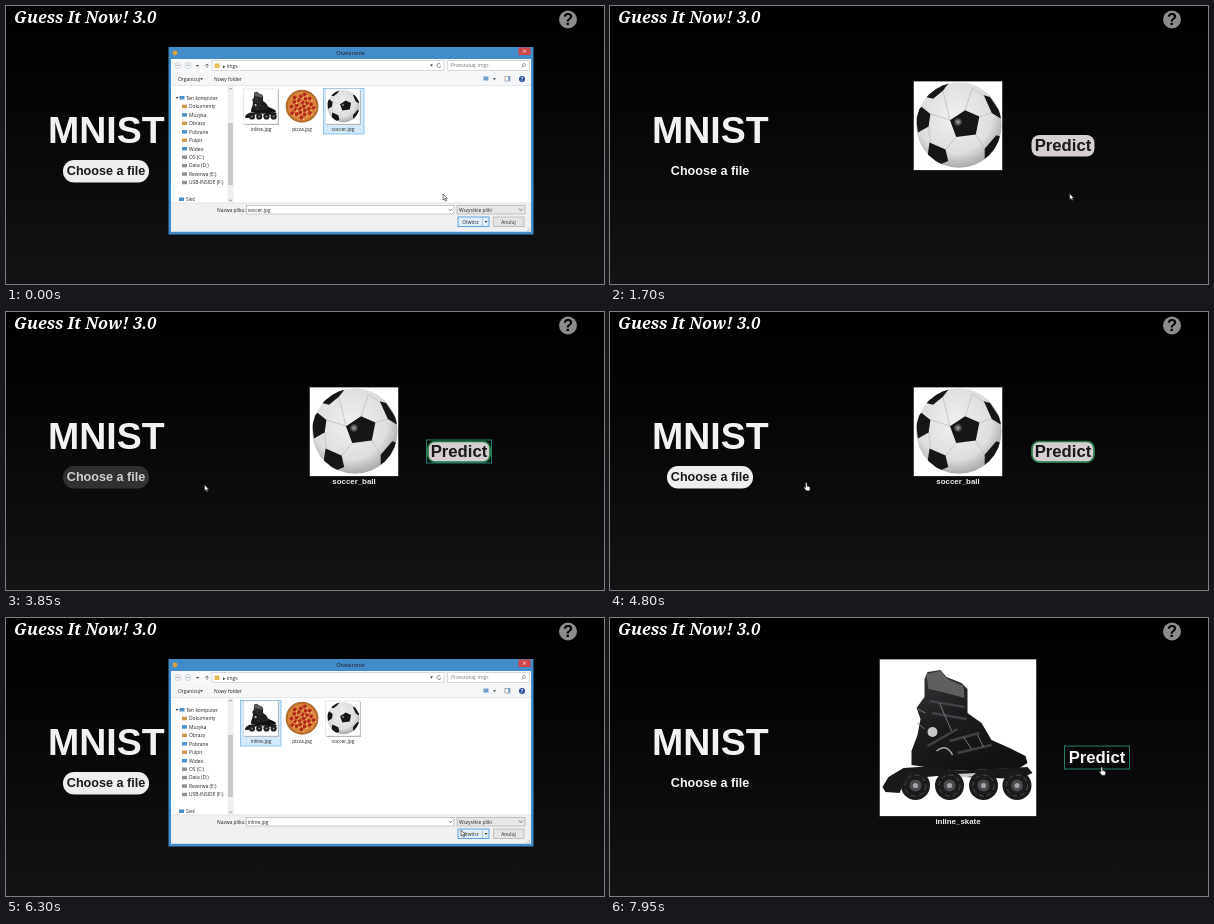
Recreate the animation shown at these times as an HTML page. Size 598 px wide and 278 px high, loop 8000 ms.

```html
<!DOCTYPE html>
<html lang="en">
<head>
<meta charset="utf-8">
<title>Image classifier demo</title>
<style>
  html, body { margin: 0; width: 100%; height: 100%; overflow: hidden; background: #000; }
  svg { position: absolute; left: 0; top: 0; width: 598px; height: 278px; }
  #dialog { transform-origin: 344.5px 134.5px; }
  .bold { font-family: "Liberation Sans", Arial, sans-serif; font-weight: bold; }
  .ui { font-family: "Open Sans", "Noto Sans", sans-serif; font-size: 4.9px; fill: #222; }
  .mid { text-anchor: middle; }
</style>
</head>
<body>
<svg id="page" viewBox="0 0 598 278">
  <defs>
    <linearGradient id="night" x2="0" y2="1">
      <stop stop-color="#000"/><stop offset=".3" stop-color="#040405"/><stop offset="1" stop-color="#131316"/>
    </linearGradient>
    <radialGradient id="leather" cx=".45" cy=".4" r=".62">
      <stop stop-color="#f0f0f0"/><stop offset=".7" stop-color="#dedede"/><stop offset="1" stop-color="#a4a4a4"/>
    </radialGradient>
    <radialGradient id="shine"><stop stop-color="#aaa"/><stop offset="1" stop-color="#1a1a1a"/></radialGradient>
    <linearGradient id="boot" x2=".6" y2="1"><stop stop-color="#3a3a3d"/><stop offset=".5" stop-color="#1c1c1e"/><stop offset="1" stop-color="#111"/></linearGradient>
    <clipPath id="round"><circle cx="51" cy="49.5" r="48"/></clipPath>

    <symbol id="ball" viewBox="0 0 100 100">
      <rect width="100" height="100" fill="#fff"/>
      <circle cx="51" cy="49.5" r="48" fill="url(#leather)"/>
      <g clip-path="url(#round)">
        <path d="M41 44L33 11M41 44L19 37M58 33L66 8M74 40L88 36M70 60L80 76M48 63L36 77M17 51L19 69M66 8L81 18M39 90L62 92L80 88" fill="none" stroke="#bbb" stroke-width=".8"/>
        <path d="M41 44L58 33L74 40L70 60L48 63ZM14 18L23 6L40 2L33 11L22 20ZM2 36L9 29L19 37L17 51L5 58ZM18 69L36 77L39 90L29 94L16 83ZM79 16L86 18L98 36L98 42L88 36ZM80 76L93 61L99 63L92 82L80 90Z" fill="#161616"/>
      </g>
      <circle cx="50" cy="46" r="5" fill="url(#shine)"/>
    </symbol>

    <symbol id="skate" viewBox="0 0 157 157">
      <rect width="157" height="157" fill="#fff"/>
      <path d="M45 20L48 13L61 11L67 18L82 24L88 30L88 54L102 64L112 81L130 89L146 97L148 104L140 109L72 112L32 106L32 92L38 76L41 60L37 49L45 38Z" fill="url(#boot)"/>
      <path d="M47 15L61 12L68 20L84 27L85 39L63 33L49 30Z" fill="#5f5f62"/>
      <path d="M50 42L85 48M52 54L87 60M48 87L78 70M70 82L100 74M78 94L112 86" stroke="#414145" stroke-width="2.5" fill="none"/>
      <path d="M38 50L46 54M38 64L45 70M60 44L72 72M84 78L92 90M98 76L104 88" stroke="#77777b"/>
      <path d="M57 92Q67 84 73 96" stroke="#aaa" stroke-width="1.5" fill="none"/>
      <circle cx="53" cy="73" r="5" fill="#c8c8c8"/>
      <path d="M3 128L9 118L24 109L54 107L72 112L148 108L153 114L140 120L58 117L36 119L24 125L20 134L6 133Z" fill="#19191b"/>
      <path d="M76 115L98 114L96 117L79 119Z" fill="#ccc"/>
      <g id="wheels"></g>
    </symbol>

    <symbol id="pizza" viewBox="0 0 100 100">
      <circle cx="50" cy="50" r="49" fill="#b06a2b"/>
      <circle cx="50" cy="50" r="43" fill="#d9843b"/>
      <g id="toppings"></g>
    </symbol>
  </defs>

  <rect width="598" height="278" fill="url(#night)"/>
  <text x="8" y="17" fill="#fff" font-family="Noto Serif, serif" font-size="16.3" font-weight="bold" font-style="italic">Guess It Now! 3.0</text>
  <circle cx="562" cy="13.5" r="9" fill="#8c8c8c"/>
  <text class="bold mid" x="562" y="19.3" font-size="16.5">?</text>
  <text class="bold mid" x="100.3" y="136.8" font-size="37.5" fill="#f2f2f2">MNIST</text>
  <rect id="chooseBg" x="57" y="154" width="86" height="22.5" rx="11"/>
  <text id="chooseText" class="bold mid" x="100" y="169.3" font-size="12.6">Choose a file</text>

  <g id="result">
    <g id="ballPhoto">
      <use href="#ball" x="303.5" y="75" width="89" height="89"/>
      <rect x="303.5" y="75.5" width="89" height="89" fill="none" stroke="#444" stroke-dasharray="1 1"/>
    </g>
    <g id="skatePhoto">
      <use href="#skate" x="269.5" y="41" width="157" height="157"/>
      <rect x="269.5" y="41.5" width="157" height="157" fill="none" stroke="#444" stroke-dasharray="1 1"/>
    </g>
    <text id="caption" class="bold mid" x="348" font-size="7.9" fill="#eee"></text>
    <g id="predict">
      <rect id="predictBg" x="421.5" y="129" width="63" height="21.5" rx="8"/>
      <text id="predictText" class="bold mid" x="453" y="145" font-size="16.7">Predict</text>
      <rect id="ring" x="422" y="129.5" width="62" height="20.5" rx="7" fill="none" stroke="#1d7a3c" stroke-width="1.6"/>
      <rect id="outline" x="420.5" y="128" width="65" height="23" fill="none" stroke="#20806c"/>
    </g>
  </g>
</svg>

<svg id="dialog" viewBox="0 0 598 278"></svg>

<svg viewBox="0 0 598 278">
  <path id="arrow" d="M0 0V6L1.4 4.8L2.5 7L3.5 6.5L2.5 4.4H4.3Z" fill="#fff" stroke="#222" stroke-width=".6"/>
  <path id="hand" d="M0 0Q1 -.9 1.5 .2V3L4.2 3.8Q5 4.4 4.2 7.8H.8L-1.7 4.4Q-1.3 3.4 0 4.5Z" fill="#fff" stroke="#222" stroke-width=".5"/>
</svg>

<script>
const LOOP = 8000;
const $ = id => document.getElementById(id);
const clamp = v => Math.min(1, Math.max(0, v));
const ramp = (t, start, length) => clamp((t - start) / length);
const within = (t, a, b) => t >= a && t < b;
const show = (el, on) => el.setAttribute("visibility", on ? "visible" : "hidden");

const rect = (x, y, w, h, fill, extra = "") => `<rect x="${x}" y="${y}" width="${w}" height="${h}" fill="${fill}" ${extra}/>`;
const label = (x, y, text, extra = "") => `<text class="ui" x="${x}" y="${y}" ${extra}>${text}</text>`;
const line = (d, stroke, width = .7) => `<path d="${d}" fill="none" stroke="${stroke}" stroke-width="${width}"/>`;
const caret = (x, y) => `<path d="M${x} ${y}h3l-1.5 1.8z" fill="#333"/>`;
const dot = (x, y, r, fill, extra = "") => `<circle cx="${x}" cy="${y}" r="${r}" fill="${fill}" ${extra}/>`;

$("wheels").innerHTML = [36, 70, 104, 137.5].map(x =>
  dot(x, 126.5, 14.5, "#1b1b1c") + dot(x, 126.5, 10.5, "none", 'stroke="#4c4c50" stroke-dasharray="5 3"') +
  dot(x, 126.5, 6, "#4a4a4e") + dot(x, 126.5, 2.6, "#a4a4a8")).join("");

$("toppings").innerHTML = Array.from({ length: 24 }, (_, i) => {
  const r = 37 * Math.sqrt((i + .5) / 24), a = i * 2.4;
  const x = 50 + r * Math.cos(a), y = 50 + r * Math.sin(a);
  return dot(x, y, 5.6, "#b5281c") + dot(x + 6, y + 5, 2.4, "#f0cf82");
}).join("");

function buildDialog() {
  const places = ["Dokumenty", "Muzyka", "Obrazy", "Pobrane", "Pulpit", "Wideo", "OS (C:)", "Data (D:)", "Rezerwa (E:)", "USB-INSIDE (F:)"];
  const files = [["skate", "inline.jpg", 255], ["pizza", "pizza.jpg", 296], ["ball", "soccer.jpg", 337]];
  const box = 'stroke="#c8ccd0" stroke-width=".7"';
  return [
    rect(162.5, 41, 365, 187.5, "#418cc9"),
    rect(165, 53, 360, 172.5, "#fff"),
    rect(512.5, 41.5, 12, 7.5, "#d0474b"), line("M517 43.7l3 3m0 -3l-3 3", "#fff"),
    dot(169, 47, 2.4, "#d9a13a"),
    label(344.5, 49.2, "Otwieranie", 'text-anchor="middle" style="font-size:5.6px"'),
    rect(165, 53, 360, 13, "#f7f8fa"),
    dot(172, 59.5, 3, "none", 'stroke="#c3c6ca" stroke-width=".7"'), dot(182, 59.5, 3, "none", 'stroke="#c3c6ca" stroke-width=".7"'),
    line("M173.5 59.5h-3l1.2 -1.2M180.5 59.5h3l-1.2 -1.2", "#9da2a8"),
    caret(190, 59), line("M201 62v-4l-1.7 1.7M201 58l1.7 1.7", "#555"),
    rect(206, 54.5, 232, 10, "#fff", box), rect(208.5, 57.5, 5, 4.5, "#e6bd55"),
    label(217, 61.5, "▸ imgs"), caret(424, 58.6), line("M434.5 58.2a2 2 0 1 0 .4 1.8", "#666"),
    rect(441.5, 54.5, 82, 10, "#fff", box), label(445, 61.3, "Przeszukaj: imgs", 'style="fill:#777"'),
    dot(518, 59, 1.5, "none", 'stroke="#777" stroke-width=".6"'), line("M517 60l-1.5 1.7", "#777"),
    rect(165, 66, 360, 13.5, "#f5f6f8"), line("M165 79.5h360", "#dfe2e6"),
    label(172, 74.8, "Organizuj"), caret(194, 72.2), label(208, 74.8, "Nowy folder"),
    rect(477.5, 70.5, 5, 4, "#6d9dca"), caret(487, 72.2),
    rect(499, 70.5, 5, 4.5, "#fff", 'stroke="#777" stroke-width=".6"'), rect(502, 70.5, 2, 4.5, "#7aa7d0"),
    dot(516, 73, 3, "#2a4f9e"), label(516, 74.8, "?", 'text-anchor="middle" style="fill:#fff;font-weight:bold"'),
    caret(169.5, 91), rect(173.5, 90, 5, 3.5, "#4d93c7"), label(180, 93.8, "Ten komputer"),
    ...places.map((name, i) => rect(176, 98.7 + i * 8.45, 5, 3.5, i < 6 ? ["#cf9a4c", "#4b91ce"][i % 2] : "#8d9297") +
      label(183, 102.3 + i * 8.45, name)),
    rect(173, 191.5, 5, 3.5, "#4a8cc4"), label(180, 195, "Sieć"),
    rect(221.5, 80, 6, 117, "#efefef"), rect(222, 117, 5, 62, "#c9c9c9"),
    line("M223 83.5l1.5 -1.5l1.5 1.5M223 193.5l1.5 1.5l1.5 -1.5", "#666"),
    `<rect id="selected" y="82.5" width="40.5" height="45.5" fill="#d3eafb" stroke="#79b8e6" stroke-width=".8"/>`,
    ...files.map(([art, name, x]) => (art === "pizza" ? "" :
      rect(x - 16.2, 84, 34, 35, "#aaa") + rect(x - 17.2, 83, 34, 35, "#fff", 'stroke="#d2d2d2" stroke-width=".6"')) +
      `<use href="#${art}" x="${x - 16.7}" y="83.5" width="33.5" height="33.5"/>` +
      label(x, 125.2, name, 'text-anchor="middle"')),
    rect(165, 197, 360, 28.5, "#f0f0f0"), line("M165 197h360", "#dcdcdc"),
    label(211, 205.7, "Nazwa pliku:"),
    `<rect id="field" x="240.5" y="199.5" width="207.5" height="8.5" fill="#fff" stroke-width=".7"/>`,
    `<rect id="marked" x="241.5" y="200.7" width="22.5" height="6" fill="#3399ff"/>`,
    label(241.7, 205.7, "", 'id="fileName"'), line("M442.6 202.7l1.8 1.8l1.8 -1.8", "#444"),
    `<path id="textCaret" d="M242.5 201v5.5" stroke="#111" stroke-width=".7"/>`,
    rect(451, 199.5, 68, 8.5, "#e7e7e7", 'stroke="#adadad" stroke-width=".7"'), label(453, 205.7, "Wszystkie pliki"),
    line("M513 202.7l1.8 1.8l1.8 -1.8", "#444"),
    `<rect id="openButton" x="452" y="211" width="31" height="9.5" stroke-width=".9"/>`,
    line("M476.5 211v9.5", "#9cbad2"), caret(478.5, 215), label(464.5, 217.5, "Otwórz", 'text-anchor="middle"'),
    rect(487.5, 211, 30.5, 9.5, "#e4e4e4", 'stroke="#adadad" stroke-width=".7"'), label(502.5, 217.5, "Anuluj", 'text-anchor="middle"'),
    line("M521 225l3 -3M523 225l1 -1", "#aaa"),
  ].join("");
}
$("dialog").innerHTML = buildDialog();

// Moments of the session, in ms
const CLOSE = [950, 6770], OPEN = 4850, PICK = 5550;
const LOADED = [1000, 6830], CLICKED = [2400, 7800], NAMED = [2500, 7900];

// time, x, y of the pointer tip
const pointer = [
  [0, 437, 188], [250, 437, 188], [800, 462, 216], [1100, 464, 219], [1300, 464, 217], [1750, 459, 184],
  [2050, 455, 143], [2650, 455, 143], [2900, 432.5, 216.5], [3350, 400, 205], [3500, 360, 189],
  [4000, 130, 166], [4500, 130, 166], [4800, 195, 171], [5000, 293, 172.5], [5150, 290, 160],
  [5450, 256, 108], [5700, 256, 108], [6150, 440, 203], [6300, 455, 212], [6600, 464, 215],
  [6900, 464, 215], [7200, 468, 198], [7600, 487, 152], [7950, 491, 149.5], [8000, 491, 149.5],
];

function pointerAt(t) {
  const i = Math.max(1, pointer.findIndex(p => p[0] > t));
  const [a, ax, ay] = pointer[i - 1], [b, bx, by] = pointer[i];
  const u = (t - a) / (b - a);
  return [ax + (bx - ax) * u, ay + (by - ay) * u];
}

// white: 1 = filled button with dark text, 0 = clear button with light text
function paintButton(name, white, tone) {
  $(name + "Bg").setAttribute("fill", `rgba(${tone},${white})`);
  const ink = 245 - 220 * white;
  $(name + "Text").setAttribute("fill", `rgb(${ink},${ink},${ink})`);
}

function dialogGone(t) {
  if (t < OPEN) return ramp(t, CLOSE[0], 250);
  return t < CLOSE[1] ? (1 - ramp(t, OPEN, 250)) ** 3 : ramp(t, CLOSE[1], 250);
}

function drawDialog(t) {
  const gone = dialogGone(t);
  const choice = t < OPEN ? "soccer.jpg" : t < PICK ? "" : "inline.jpg";
  const closing = CLOSE.some(c => within(t, c, c + 300));
  const style = $("dialog").style;
  style.opacity = 1 - gone;
  style.transform = gone ? `perspective(650px) scale(${1 - .05 * gone}) rotateX(${13 * gone}deg)` : "none";
  $("selected").setAttribute("x", choice === "soccer.jpg" ? 317.5 : 234.5);
  show($("selected"), choice && !closing);
  show($("marked"), closing);
  show($("textCaret"), !choice);
  $("fileName").textContent = choice;
  $("fileName").style.fill = closing ? "#fff" : "#222";
  $("field").setAttribute("stroke", choice ? "#b4b4b4" : "#4b98dc");
  $("openButton").setAttribute("fill", choice ? "#e2effa" : "#e4e4e4");
  $("openButton").setAttribute("stroke", choice ? "#4a9be0" : "#adadad");
}

function drawPage(t) {
  const second = t >= LOADED[1], run = second ? 1 : 0;
  show($("result"), t >= LOADED[0]);
  show($("ballPhoto"), t >= LOADED[0] && !second);
  show($("skatePhoto"), second);
  $("caption").textContent = t < NAMED[run] ? "" : second ? "inline_skate" : "soccer_ball";
  $("caption").setAttribute("y", second ? 206 : 172);

  $("predict").setAttribute("transform", `translate(${second ? 34 : 0} 0)`);
  $("predict").setAttribute("opacity", ramp(t, LOADED[run], 210));
  const clear = second ? ramp(t, 7500, 300) : ramp(t, 2000, 300) - ramp(t, 2750, 300);
  paintButton("predict", 1 - clear, "213,206,211");
  const clicked = t >= CLICKED[run];
  show($("ring"), clicked);
  $("ring").setAttribute("opacity", 1 - clear);
  show($("outline"), clicked && (second || t < 4400));

  const chooseClear = second ? ramp(t, 7000, 300) : ramp(t, 1250, 300) - ramp(t, 3800, 300);
  paintButton("choose", 1 - chooseClear, "238,238,240");
}

function drawPointer(t) {
  const [x, y] = pointerAt(t);
  const hand = within(t, 2000, 2680) || within(t, 3920, 4850) || t >= 7540;
  for (const name of ["arrow", "hand"]) {
    $(name).setAttribute("transform", `translate(${x} ${y})`);
    show($(name), (name === "hand") === hand);
  }
}

const began = performance.now();
function frame() {
  const t = (performance.now() - began) % LOOP;
  drawPage(t);
  drawDialog(t);
  drawPointer(t);
  requestAnimationFrame(frame);
}
frame();
</script>
</body>
</html>
```
